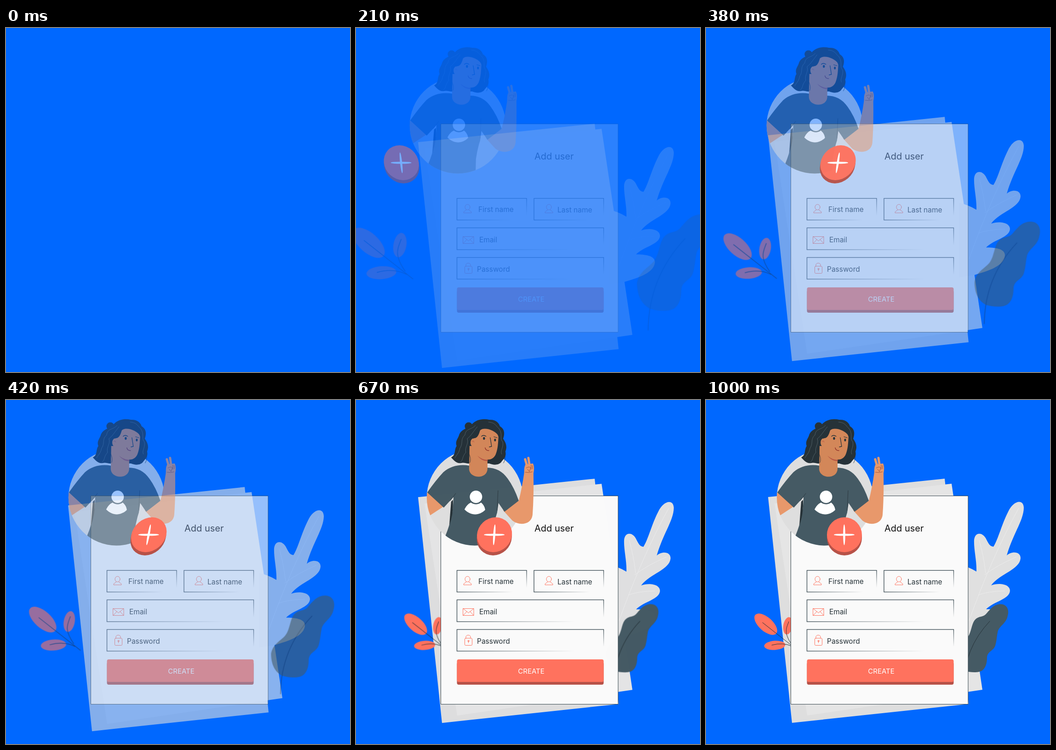
An HTML page for the animation above (1.04 s loop, 748 by 748 pixels).

```html
<!DOCTYPE html>
<html lang="en">
<head>
<meta charset="utf-8">
<title>Add user</title>
<style>
html, body { margin: 0; width: 100%; height: 100%; overflow: hidden; background: #0068ff; }
svg { display: block; width: 100vw; height: 100vh; }
text { font: 15.5px Inter, "Open Sans", sans-serif; fill: #263238; }
.line { fill: none; stroke: #263238; stroke-linecap: round; stroke-linejoin: round; }
.icon { fill: none; stroke: #ff725e; stroke-linecap: round; stroke-linejoin: round; }
.arm { fill: #e8986b; }
.face { fill: #d38759; }
.hair { fill: #263238; }
.shirt { fill: #455a64; }
.coral { fill: #ff725e; }
.depth { fill: #b75248; }
</style>
</head>
<body>
<svg viewBox="0 0 748 748">
  <defs>
    <linearGradient id="fade" x2="1" y2="1">
      <stop offset=".5" stop-color="#37474f"/>
      <stop offset=".9" stop-color="#37474f" stop-opacity="0"/>
    </linearGradient>
    <clipPath id="disc"><circle cx="258.5" cy="212" r="104.5"/></clipPath>
    <g id="person" class="icon">
      <ellipse cy="389.500" rx="5.500" ry="6"/>
      <path d="M-3 395Q-3 397-6 398Q-9 399-8.500 402H8.500Q9 399 6 398Q3 397 3 395"/>
    </g>
  </defs>

  <g id="papers">
    <path fill="#dedede" d="M135 211L519 171L571 661L187 702Z"/>
    <path fill="#e5e5e5" d="M149 225L534 182L601 630L220 686Z"/>
    <path fill="#e0e0e0" d="M550 358Q570 362 588 373C589 350 582 325 583 304C585 287 600 287 608 300C614 311 616 318 625 319C635 304 643 270 657 243C668 219 690 214 691 234C691 261 668 290 654 338C663 329 684 328 684 344C682 369 640 377 620 403C637 397 661 400 661 415C659 434 627 437 609 455C627 455 650 457 650 472C648 498 605 508 583 515L550 520Z"/>
    <path fill="none" stroke="#ececec" d="M680 235Q622 340 572 480M594 305Q603 335 608 376M675 341Q632 360 606 380M650 415Q612 416 592 424"/>
  </g>

  <g id="plants">
    <path class="shirt" d="M641 444C654 444 660 456 656 469C653 487 636 491 634 506C632 516 632 524 629 534C625 546 612 546 611 560C611 576 606 588 594 591C585 593 572 592 563 589C548 581 543 566 543 549C546 532 560 526 568 517C577 507 577 488 584 479C593 468 602 474 610 464C619 454 626 444 641 444Z"/>
    <path class="line" d="M617 481Q561 540 560 622"/>
    <g class="coral">
      <ellipse cx="130" cy="487.500" rx="30.500" ry="15" transform="rotate(42 130 487.500)"/>
      <ellipse cx="178" cy="491" rx="10" ry="19" transform="rotate(10 178 491)"/>
      <ellipse cx="149.500" cy="533.500" rx="23" ry="10" transform="rotate(-4 149.500 533.500)"/>
    </g>
    <path class="line" d="M123 484Q161 514 198 543M143 533Q168 526 188 536M180 482C175 496 168 505 186 531"/>
  </g>

  <g id="form">
    <path fill="#fafafa" stroke="#37474f" d="M184.500 208.500H570V661.500H184.500Z"/>
    <text x="388" y="286" style="font-size:20px;fill:#111">Add user</text>
    <g fill="none" stroke="url(#fade)" stroke-width="1.300">
      <rect x="219.500" y="370.500" width="151.500" height="47"/>
      <rect x="387" y="370.500" width="151.500" height="47"/>
      <rect x="219.500" y="434.500" width="319" height="47.500"/>
      <rect x="219.500" y="499" width="319" height="47"/>
    </g>
    <use href="#person" x="242.500"/>
    <use href="#person" x="419.500"/>
    <g class="icon">
      <path d="M233 453.500H256V468.500H233ZL244.500 463L256 453.500M233 468.500L241 460M256 468.500L248 460"/>
      <rect x="236.500" y="518" width="16" height="15.500" rx="2"/>
      <path d="M239 518V515C239 510 249 510 249 515V518M244.500 524V528"/>
      <circle cx="244.500" cy="524" r="1.500"/>
    </g>
    <text x="266" y="400">First name</text>
    <text x="438" y="401">Last name</text>
    <text x="268" y="466">Email</text>
    <text x="263" y="530">Password</text>
    <rect class="depth" x="219.500" y="570" width="319" height="49" rx="4"/>
    <rect class="coral" x="219.500" y="564" width="319" height="49" rx="4"/>
    <text x="381" y="594.500" text-anchor="middle" style="font-size:15px;fill:#fff">CREATE</text>
  </g>

  <g id="woman">
    <circle cx="258.500" cy="212" r="104.500" fill="#dedede"/>
    <path class="hair" d="M252 53C262 42 276 40 290 43C304 42 311 50 313 57C325 64 323 76 320 84C327 94 329 102 325 112C328 124 320 129 316 135C309 143 297 141 290 138L250 138C240 139 235 135 229 137C218 139 212 130 207 125C218 119 213 108 219 100C215 90 222 84 224 77C228 64 239 64 252 53Z"/>
    <circle class="hair" cx="245" cy="57" r="8.500"/>
    <path class="arm" d="M320 240L354 219Q361 192 366 157L386 157Q387 210 384 250C381 273 353 273 340 262Z"/>
    <path class="arm" d="M366 159Q365 145 369 140L385 138Q389 146 386 159Z"/>
    <path fill="none" stroke="#e8986b" stroke-width="5" stroke-linecap="round" d="M368 129L373 147M375 126L378 146"/>
    <path fill="none" stroke="#a65a3b" d="M370 148Q376 144 380 147L377 156L373 150M381 141V151M384 142V150M368 157Q377 159 384 156"/>
    <g clip-path="url(#disc)">
      <path class="arm" d="M150 197L193 230L161 251L150 250Z"/>
      <path class="shirt" d="M247 143C227 139 206 143 190 157Q174 174 155 201L191 234L212 211Q212 253 195 294L190 325H297L298 285Q301 263 307 245L310 224L323 243L354 219Q344 190 330 171C319 155 304 147 284 147Z"/>
      <path class="line" d="M217 203L205 219M309 197L307 240" stroke-width=".8"/>
      <path class="hair" d="M207 221L211 217Q212 250 203 273Q205 245 207 221Z"/>
    </g>
    <path class="face" d="M247 100H286V149C286 173 247 172 246 150Z"/>
    <path fill="#b85745" d="M264 121Q276 131 287 130L286 133Q273 133 264 121Z"/>
    <path class="face" d="M270 66C278 58 302 65 310 78C309 94 309 105 304 118C300 127 292 131 285 129C272 126 261 116 258 103C246 102 247 83 257 83C264 83 267 76 270 66Z"/>
    <path class="hair" d="M269 62Q277 51 289 57Q304 62 310 80L316 69L292 47L266 50L246 73L255 84Q268 79 269 62Z"/>
    <g class="hair">
      <ellipse cx="278.500" cy="83.500" rx="2.200" ry="3"/>
      <ellipse cx="302.500" cy="87" rx="2" ry="3"/>
    </g>
    <path class="line" d="M273 79Q277 75 283 79M300 80L307 82M292 82L295 101L290 102" stroke-width="1.300"/>
    <path fill="none" stroke="#8f3028" stroke-width="1.500" stroke-linecap="round" d="M281 104Q282 110 289 110"/>
    <path fill="none" stroke="#b85745" d="M252 91Q255 87 257 92"/>
    <path fill="none" stroke="#607178" stroke-width=".7" d="M260 55C250 66 239 61 237 76C226 86 234 94 226 105C224 116 219 119 215 126M264 58C252 73 250 78 242 84C246 96 236 101 239 114C230 124 234 130 227 135M288 48C304 49 305 58 311 62C320 75 312 84 319 91C322 102 313 110 317 118"/>
    <path class="line" stroke-width=".8" d="M246 104C240 116 253 121 248 136M319 112Q329 124 321 137"/>
    <g fill="#fff">
      <circle cx="261" cy="210.500" r="13.500"/>
      <path d="M236 238C240 230 245 225 250 223C257 228 265 228 272 223C277 227 280 232 281 239C268 252 250 252 236 238Z"/>
    </g>
  </g>

  <g id="plus">
    <path class="depth" d="M263 293V300A38 38 0 0 0 339 300V293Z"/>
    <circle class="coral" cx="301" cy="293" r="38"/>
    <g fill="#fff">
      <ellipse cx="300.500" cy="293" rx="22.500" ry="2.300"/>
      <ellipse cx="300.500" cy="293" rx="2.300" ry="22.500"/>
    </g>
  </g>
</svg>
<script>
const LOOP = 1040, FRAME = 1000 / 24;
const part = id => document.getElementById(id);

const cubic = (s, a, b) => 3 * s * (1 - s) ** 2 * a + 3 * s * s * (1 - s) * b + s ** 3;

// cubic-bezier(.36, -.01, .5, 1.38): runs slightly past the end and settles
function ease(x) {
  if (x >= 1) return 1;
  let lo = 0, hi = 1;
  for (let i = 0; i < 24; i++) {
    const mid = (lo + hi) / 2;
    if (cubic(mid, .36, .5) < x) lo = mid; else hi = mid;
  }
  return cubic(lo, -.01, 1.38);
}

function pose(id, transform, opacity) {
  part(id).setAttribute("transform", transform);
  part(id).setAttribute("opacity", Math.min(1, Math.max(0, opacity)));
}

// The badge flies in leaning, then sways upright
function badge(f) {
  if (f < .6) {
    const e = ease(f / .6);
    return { x: -374 * (1 - e), lean: 20 - 30 * e, opacity: e };
  }
  const lean = f < .8 ? -10 + 12 * ease((f - .6) / .2) : 2 - 2 * ease((f - .8) / .2);
  return { x: 0, lean, opacity: 1 };
}

function draw(ms) {
  const step = Math.floor((ms % LOOP + 5) / FRAME);
  const f = Math.min(1, (step + .25) / 24);
  const shown = step > 1 ? 1 : 0;
  const p = ease(f), left = 1 - p, b = badge(f);
  pose("papers", `translate(0 ${45 * left})`, p * shown);
  pose("plants", `translate(378 537) scale(${1 + .5 * left}) translate(-378 -537)`, p * shown);
  pose("form", "", p * shown);
  pose("woman", `translate(${-45 * left} 0)`, p * shown);
  pose("plus", `translate(${b.x} 295) skewX(${b.lean}) translate(0 -295)`, b.opacity * shown);
}

const start = performance.now();
function tick() {
  draw(performance.now() - start);
  requestAnimationFrame(tick);
}
tick();
</script>
</body>
</html>
```
